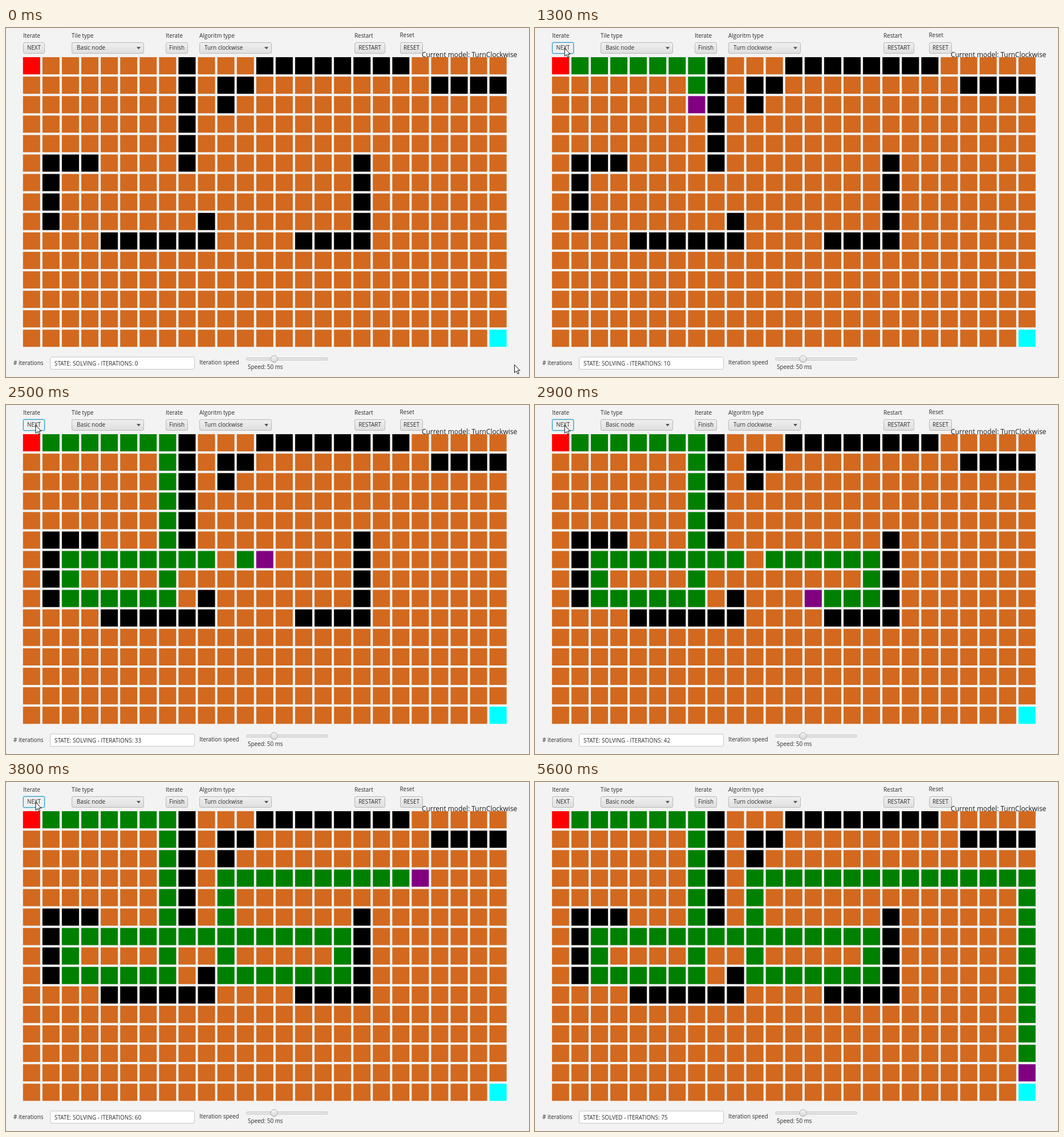
Recreate the animation shown at these times as an HTML page. Size 917 by 611 pixels, loop 5.7 s.

```html
<!DOCTYPE html>
<html lang="en">
<head>
<meta charset="utf-8">
<title>Grid path solver</title>
<style>
  html, body { margin: 0; width: 100%; height: 100%; overflow: hidden; background: #f4f3f3; }
  svg { display: block; width: 100%; height: 100%; }
  text { font: 9.9px "Open Sans", "Noto Sans", sans-serif; fill: #2b2b2b; white-space: pre; }
  .model { font-size: 11.95px; fill: #1c1c1c; }
</style>
</head>
<body>
<svg id="stage" viewBox="0 0 917 611">
  <defs>
    <linearGradient id="face" x2="0" y2="1">
      <stop offset="0" stop-color="#f0f0f0"/>
      <stop offset="1" stop-color="#dedede"/>
    </linearGradient>
    <linearGradient id="knob" x2="0" y2="1">
      <stop offset="0" stop-color="#f6f6f6"/>
      <stop offset="1" stop-color="#d6d6d6"/>
    </linearGradient>
  </defs>
</svg>
<script>
const LOOP = 5700, STEP = 100, COLS = 25, ROWS = 15, PITCH = 34.08, SIZE = 30;
const CLICK = 800, LEAVE = 5600;
const COLOR = { free: '#d2691e', wall: '#000', start: '#f00', goal: '#0ff', path: '#008000', head: '#800080' };

// Walls as runs: column, row, columns, rows
const WALLS = [
  [8, 0, 1, 6], [12, 0, 8, 1], [10, 1, 2, 1], [10, 2, 1, 1], [21, 1, 4, 1],
  [1, 5, 3, 1], [1, 6, 1, 3], [17, 5, 1, 5], [14, 9, 3, 1], [4, 9, 6, 1], [9, 8, 1, 1]
];
// Time and iteration count
const PACE = [[CLICK, 0], [1300, 10], [2000, 23], [2900, 42], [3800, 60], [4500, 74], [4550, 75]];

const stage = document.getElementById('stage');

function add(tag, attrs, content) {
  const el = document.createElementNS('http://www.w3.org/2000/svg', tag);
  for (const key in attrs) el.setAttribute(key, attrs[key]);
  if (content) el.textContent = content;
  return stage.appendChild(el);
}

const label = (x, y, content, cls = '') => add('text', { x, y, class: cls }, content);

function box(x, y, width, height, fill, stroke) {
  return add('rect', { x: x + .5, y: y + .5, width: width - 1, height: height - 1, rx: 2.5, fill, stroke });
}

function button(x, width, content) {
  const rect = box(x, 25, width, 20, 'url(#face)', '#b9b9b9');
  add('text', { x: x + width / 2, y: 38.3, 'text-anchor': 'middle' }, content);
  return rect;
}

function combo(x, content) {
  box(x, 25, 127, 20, 'url(#face)', '#b9b9b9');
  label(x + 9, 38.3, content);
  add('path', { d: `M${x + 114} 33.3h7l-3.5 4z`, fill: '#4a4a4a' });
}

function isWall(c, r) {
  return WALLS.some(([x, y, w, h]) => c >= x && c < x + w && r >= y && r < y + h);
}

// Go straight ahead, turn clockwise when blocked
function solve() {
  const route = [[0, 0]];
  let c = 0, r = 0, dx = 1, dy = 0;
  while (c < COLS - 1 || r < ROWS - 1) {
    const x = c + dx, y = r + dy;
    if (x < 0 || y < 0 || x >= COLS || y >= ROWS || isWall(x, y)) {
      [dx, dy] = [-dy, dx];
    } else {
      route.push([c = x, r = y]);
    }
  }
  return route;
}

const cells = [];
for (let i = 0; i < COLS * ROWS; i++) {
  const c = i % COLS, r = Math.floor(i / COLS);
  cells.push(add('rect', {
    x: 29.8 + c * PITCH, y: 51.1 + r * PITCH, width: SIZE, height: SIZE,
    fill: isWall(c, r) ? COLOR.wall : COLOR.free
  }));
}
const paint = ([c, r], color) => cells[r * COLS + c].setAttribute('fill', color);
const route = solve();
paint([0, 0], COLOR.start);
paint([COLS - 1, ROWS - 1], COLOR.goal);

label(30, 17, 'Iterate');
label(115, 17, 'Tile type');
label(280, 17, 'Iterate');
label(339, 17, 'Algoritm type');
label(611, 17, 'Restart');
label(690.5, 16.3, 'Reset');
const halo = add('rect', { x: 29, y: 24, width: 40, height: 22, rx: 3.5, fill: '#a9dcee' });
const next = button(30, 38, 'NEXT');
combo(115, 'Basic node');
button(280, 39, 'Finish');
combo(339, 'Turn clockwise');
button(611, 54, 'RESTART');
button(691, 40, 'RESET');
label(729, 51, 'Current model: TurnClockwise', 'model');

label(13, 589.7, '# iterations');
box(77, 575.5, 254, 22.5, '#fff', '#c4c4c4');
const status = label(85, 590.6, '');
label(339, 589, 'Iteration speed');
add('rect', { x: 421.5, y: 577.5, width: 143, height: 4, rx: 2, fill: '#e6e6e6', stroke: '#c2c2c2' });
add('circle', { cx: 470, cy: 579.5, r: 6, fill: 'url(#knob)', stroke: '#a9a9a9' });
label(424, 596.8, 'Speed: 50 ms');

const cursor = add('path', {
  d: 'M0 0V14L3.3 11L5.6 16.2L7.8 15.2L5.5 10.2H9.8Z',
  fill: '#fff', stroke: '#111', 'stroke-width': 1, 'stroke-linejoin': 'round'
});

function countAt(t) {
  if (t <= CLICK) return 0;
  const i = PACE.findIndex(([time]) => time >= t);
  if (i < 0) return 75;
  const [t0, n0] = PACE[i - 1], [t1, n1] = PACE[i];
  return Math.floor(n0 + (n1 - n0) * (t - t0) / (t1 - t0) + 1e-6);
}

function render(t) {
  const count = countAt(t), solved = count === 75;
  const head = Math.min(count - 1, 73);
  for (let i = 1; i < route.length - 1; i++) {
    paint(route[i], i < head ? COLOR.path : i === head ? COLOR.head : COLOR.free);
  }
  status.textContent = `STATE: ${solved ? 'SOLVED' : 'SOLVING'} - ITERATIONS: ${count}`;

  const focused = t >= CLICK && t < LEAVE;
  halo.setAttribute('visibility', focused ? 'visible' : 'hidden');
  next.setAttribute('stroke', focused ? '#2d9fc4' : '#b9b9b9');
  next.setAttribute('fill', focused ? '#f0f0f0' : 'url(#face)');

  const p = Math.min(t / 700, 1), k = p * p * (3 - 2 * p);
  cursor.setAttribute('transform', `translate(${891.5 - 839.5 * k} ${589.5 - 554 * k})`);
  cursor.setAttribute('visibility', t < LEAVE ? 'visible' : 'hidden');
}

const begin = performance.now();
function tick() {
  const t = (performance.now() - begin) % LOOP;
  render(Math.floor(t / STEP) * STEP);
  requestAnimationFrame(tick);
}
tick();
</script>
</body>
</html>
```
